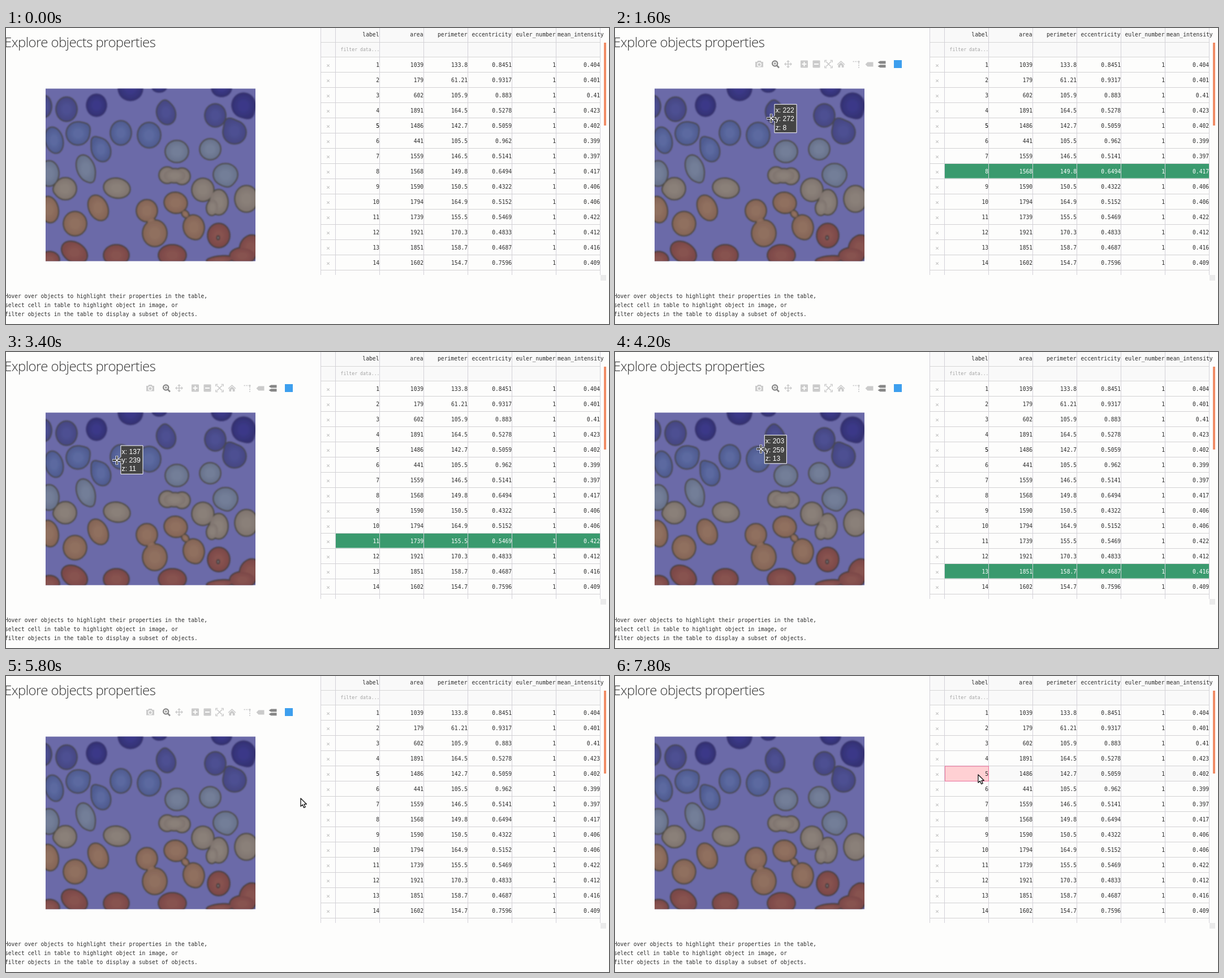
An HTML page that plays this animation: 1066 by 525 pixels, repeating every 8000 ms.

```html
<!DOCTYPE html>
<html lang="en">
<head>
<meta charset="utf-8">
<title>Object properties explorer</title>
<style>
  html, body { margin: 0; width: 100%; height: 100%; overflow: hidden; background: #fdfdfc; }
  svg { display: block; width: 1066px; height: 525px; }
  text { white-space: pre; }
  .title { font: 300 24px "Open Sans", "Noto Sans", sans-serif; letter-spacing: -.6px; fill: #333; }
  .mono { font-family: "DejaVu Sans Mono", monospace; font-size: 9.7px; fill: #2b2b2b; }
  .note { font-size: 9.6px; }
  .hint { font-size: 8.2px; fill: #a3a3a3; }
  .cross { fill: #b9b9b9; font-size: 11px; text-anchor: middle; }
  .end { text-anchor: end; }
  .hover text { fill: #fff; }
  .tip { font: 12.2px "Liberation Sans", Arial, sans-serif; fill: #fff; }
</style>
</head>
<body>
<svg id="stage" viewBox="0 0 1066 525" xmlns="http://www.w3.org/2000/svg"></svg>
<script>
const LOOP = 8000, STEP = 200;
const stage = document.getElementById('stage');

// ---- small markup helpers ----
const rect = (x, y, w, h, fill, more = '') =>
  `<rect x="${x}" y="${y}" width="${w}" height="${h}" fill="${fill}" ${more}/>`;
const text = (x, y, cls, s) => `<text x="${x}" y="${y}" class="${cls}">${s}</text>`;
const path = (d, fill, more = '') => `<path d="${d}" fill="${fill}" ${more}/>`;
const line = (d, color, width = 1) =>
  path(d, 'none', `stroke="${color}" stroke-width="${width}"`);

// ---- micrograph ----
// blob: cx, cy, rx, ry, rotation, direction of the tip, size of the tip
const groups = [
  { mid: '#3b3988', edge: '#343274', rim: '#37356f', blobs: [
    [220, 107, 23, 23], [271, 105, 14, 10], [381, 106, 19, 17],
    [420, 137, 22, 23, 0, 58, .22], [160, 137, 19, 21]] },
  { mid: '#4d5092', edge: '#454682', rim: '#464657', blobs: [
    [67, 139, 15, 21], [107, 144, 20, 23], [283, 151, 18, 22, -18, -92, .16],
    [370, 155, 20, 22], [404, 185, 22, 22, 0, -118, .35]] },
  { mid: '#5b69a0', edge: '#4f5b90', rim: '#4a4a52', blobs: [
    [203, 186, 20, 23], [127, 187, 22, 22, 15, -35, .18], [253, 190, 22, 24],
    [85, 199, 17, 25, -15], [168, 216, 18, 23, -20, -128, .25]] },
  { mid: '#737e98', edge: '#68728c', rim: '#4d4c4a', blobs: [
    [302, 219, 22, 21], [361, 215, 20, 20, 20], [141, 249, 17, 26, -20, 58, .12],
    [388, 260, 23, 21, 0, 75, .14], [76, 258, 19, 24]] },
  { mid: '#8a8079', edge: '#7f746f', rim: '#4e4b44', blobs: [
    [285, 261, 16, 16], [311, 263, 16, 16], [298, 262, 22, 14],
    [105, 285, 21, 21, 0, 175, .12], [196, 284, 25, 19, 10],
    [348, 287, 21, 22], [376, 309, 18, 24], [365, 318, 12, 16, 10],
    [425, 303, 22, 25]] },
  { mid: '#90705f', edge: '#856557', rim: '#4e4841', blobs: [
    [300, 310, 22, 20, 15], [317, 330, 7, 9, -40], [332, 353, 20, 23, -10, 65, .08],
    [163, 319, 18, 25, -25], [249, 324, 20, 21], [257, 344, 9, 10],
    [263, 364, 23, 25], [122, 347, 22, 23], [76, 322, 18, 25, -12]] },
  { mid: '#87524f', edge: '#7b4848', rim: '#4a403f', blobs: [
    [376, 368, 21, 23], [121, 398, 26, 19, 32], [195, 403, 24, 20],
    [294, 403, 26, 20], [432, 389, 20, 24, 25], [418, 404, 24, 16],
    [378, 411, 25, 8, -6], [77, 411, 19, 16]] }
];

function outline([cx, cy, rx, ry, turn = 0, tip = 0, size = 0]) {
  const rad = Math.PI / 180, c = Math.cos(turn * rad), s = Math.sin(turn * rad);
  const points = [];
  for (let i = 0; i < 48; i++) {
    const a = i * 7.5 * rad;
    let gap = a - (tip - turn) * rad;
    gap = Math.atan2(Math.sin(gap), Math.cos(gap));
    const k = 1 + size * Math.exp(-((gap / .42) ** 2));
    const x = (rx - 2.5) * k * Math.cos(a), y = (ry - 2.5) * k * Math.sin(a);
    points.push((cx + x * c - y * s).toFixed(1) + ' ' + (cy + x * s + y * c).toFixed(1));
  }
  return 'M' + points.join('L') + 'Z';
}

function micrograph() {
  let defs = '', rims = '', fills = '';
  groups.forEach((g, i) => {
    const d = g.blobs.map(outline);
    defs += `<radialGradient id="tone${i}"><stop offset=".35" stop-color="${g.mid}"/>` +
      `<stop offset="1" stop-color="${g.edge}"/></radialGradient>`;
    rims += d.map(p => path(p, g.rim, `stroke="${g.rim}" stroke-width="4.6"`)).join('');
    fills += d.map(p => path(p, `url(#tone${i})`)).join('');
  });
  return `<defs>${defs}<clipPath id="frame">${rect(70, 107.5, 371, 306, '#000')}</clipPath>
    <filter id="soft" x="0" y="0" width="1" height="1"><feGaussianBlur stdDeviation=".8"/></filter></defs>
    <g clip-path="url(#frame)">${rect(70, 107, 371, 307, '#6b6aa8')}
    <g filter="url(#soft)">${rims}${fills}
    <ellipse cx="375" cy="372" rx="3.5" ry="4.5" fill="#4b3f40"/>
    <ellipse cx="375" cy="372" rx="1.3" ry="2" fill="#7d7477"/></g></g>`;
}

// ---- table ----
const heads = ['label', 'area', 'perimeter', 'eccentricity', 'euler_number'];
const rows = `1039 133.8 0.8451 0.404
179 61.21 0.9317 0.401
602 105.9 0.883 0.41
1891 164.5 0.5278 0.423
1486 142.7 0.5059 0.402
441 105.5 0.962 0.399
1559 146.5 0.5141 0.397
1568 149.8 0.6494 0.417
1590 150.5 0.4322 0.406
1794 164.9 0.5152 0.406
1739 155.5 0.5469 0.422
1921 170.3 0.4833 0.412
1851 158.7 0.4687 0.416
1602 154.7 0.7596 0.409`.split('\n').map((row, i) => {
  const [area, rim, ecc, mean] = row.split(' ');
  return [i + 1, area, rim, ecc, 1, mean];
});
const colRight = i => 660.5 + 78 * i;
const rowTop = n => 51.5 + 27 * (n - 1);

function table() {
  let s = rect(556, 0, 495, 51, '#f9f9f9');
  s += rect(583, rowTop(5), 468, 27, '#f9f9f9', 'id="activeRow"');
  rows.forEach((r, i) => {
    const n = i + 1, y = rowTop(n);
    s += `<g id="row${n}">` + rect(583, y + .5, 468, 25.5, '#3a9a6e', 'class="band" visibility="hidden"') +
      r.map((v, c) => text(colRight(c) - .3, y + 17.7, 'mono end', v)).join('') + '</g>';
    s += text(569.5, y + 18, 'mono cross', '×');
  });
  for (let y = 25; y < 52; y += 26) s += line(`M556 ${y + .5}H1051`, '#d6d6d6');
  for (let n = 2; n < 16; n++) s += line(`M556 ${rowTop(n)}H1051`, '#d2d1d3');
  for (const x of [556.5, 582.5, 660.5, 738.5, 816.5, 894.5, 972.5, 1050.5])
    s += line(`M${x} 0V438`, '#d3d1d8');
  s += heads.map((h, c) => text(colRight(c) - 1, 15, 'mono end', h)).join('');
  s += text(975, 15, 'mono', 'mean_intensity') + text(591.5, 41, 'mono hint', 'filter data...');
  s += rect(583.5, 160, 77, 26.5, '#ffd0d3', 'stroke="#ea6f9c" id="activeCell"');
  s += text(colRight(0) - .3, rowTop(5) + 17.7, 'mono end', '5');
  return s + rect(1057, 26, 4, 147, '#f08c66') + rect(1051, 438, 10, 10, '#ebebeb');
}

// ---- toolbar ----
function toolbar() {
  const pale = '#cbcbcb', dark = '#868686';
  const at = (x, s) => `<g transform="translate(${x} 64)">${s}</g>`;
  const hole = '#fdfdfc';
  const tag = (y, h, c) => path(`M-7 ${y}l4 ${-h / 2}H7v${h}H-3Z`, c);
  return '<g id="toolbar" visibility="hidden">' +
    at(255, path('M-7-4h3l1.5-2h5l1.5 2h3v9.5H-7Z', pale) +
      `<circle cy=".7" r="3.2" fill="none" stroke="${hole}" stroke-width="1.4"/>`) +
    at(283, `<circle cx="-.3" cy="-1" r="4.6" fill="none" stroke="${dark}" stroke-width="2.2"/>` +
      line('M3 2.3L7 6.5', dark, 2.6) + line('M-2.6-1h4.6M-.3-3.3v4.6', dark, 1.2)) +
    at(306, line('M-5 0H5M0-5V5', pale, 1.6) +
      path('M-7 0l3-3v6ZM7 0l-3-3v6ZM0-7l-3 3h6ZM0 7l-3-3h6Z', pale)) +
    at(334.5, rect(-6.5, -6.5, 13, 13, pale, 'rx="1"') + line('M-4 0H4M0-4V4', hole, 2)) +
    at(356, rect(-6.5, -6.5, 13, 13, pale, 'rx="1"') + line('M-4 0H4', hole, 2)) +
    at(377.5, line('M-4.5-4.5L4.5 4.5M4.5-4.5L-4.5 4.5', pale, 1.6) +
      line('M-6.5-3v-3.5H-3M3-6.5h3.5V-3M6.5 3v3.5H3M-3 6.5h-3.5V3', pale, 1.6)) +
    at(399.5, path('M-7 .5L0-6L7 .5L6 1.5L0-4L-6 1.5ZM-5 1.7L0-2.8L5 1.7V6H1.3V2.2H-1.3V6H-5Z', pale)) +
    at(426.5, line('M-6-4.5H3M4.5-3V7', pale, 1.6).replace('/>', ' stroke-dasharray="2.4 1.6"/>') +
      '<circle cx="4.5" cy="-4.5" r="1.6" fill="' + pale + '"/>') +
    at(449.5, tag(.5, 8, pale)) +
    at(471.5, tag(-3, 5, dark) + tag(3.7, 5, dark)) +
    at(500, rect(-7, -7, 14, 14, '#3d9fee')) + '</g>';
}

// ---- pointer and tooltip ----
const plus = 'M-7.5 0H-1.5M1.5 0H7.5M0-7.5V-1.5M0 1.5V7.5';
const pointer =
  `<g id="plus">${line('M-8 0H8M0-8V8', '#fff', 4)}${line(plus, '#111', 1.8)}</g>
   <g id="arrow">${path('M0 0V14.2L3.3 11.2L5.6 16.6L8.2 15.5L5.9 10.3H10.3Z', '#fff',
    'stroke="#111" stroke-width="1.3" stroke-linejoin="round"')}</g>`;
const tooltip = `<g id="tooltip">${path('M0 0L5.5 5.5V25.2H44.6V-25.2H5.5V-5.5Z', '#444', 'stroke="#fff"')}
  ${['x', 'y', 'z'].map((k, i) => text(7.2, -10.4 + 15.3 * i, 'tip', '').replace('<text', `<text id="tip-${k}"`)).join('')}</g>`;

stage.innerHTML = rect(0, 0, 1066, 525, '#fdfdfc') +
  text(-3, 34, 'title', 'Explore objects properties') +
  ['Hover over objects to highlight their properties in the table,',
   'select cell in table to highlight object in image, or',
   'filter objects in the table to display a subset of objects.']
    .map((s, i) => text(-2, 479 + 16 * i, 'mono note', s)).join('') +
  micrograph() + table() + toolbar() + tooltip + pointer;

// ---- motion ----
// time, x, y of the pointer
const moves = [
  [400, 395, 80], [800, 310, 118], [1000, 282, 131], [1200, 275, 135], [1400, 281, 146],
  [1600, 276, 160], [2000, 258, 186], [2200, 254, 194], [2400, 246, 195], [2600, 226, 192],
  [3000, 206, 192], [3200, 196, 192], [3600, 196, 192], [3800, 205, 186], [4200, 258, 172],
  [4400, 275, 158], [4600, 279, 157], [4800, 279, 157], [5000, 296, 160], [5200, 352, 170],
  [5400, 405, 185], [5800, 521, 217], [6000, 548, 214], [6400, 612, 192], [6800, 642, 175]
];
// time, hovered object (0 for none), x, y in image units
const hovers = [
  [0, 0], [1400, 8, 225, 285], [1600, 8, 222, 272], [1800, 13, 209, 255], [2000, 13, 203, 244],
  [2200, 13, 197, 235], [3000, 11, 147, 239], [3200, 11, 137, 239], [3800, 11, 146, 244],
  [4000, 13, 178, 250], [4200, 13, 203, 259], [4400, 8, 220, 272], [4600, 8, 223, 274],
  [5000, 8, 243, 272], [5200, 9, 303, 262], [5400, 10, 360, 246], [5600, 0]
];
const SHOW_BAR = 400, HIDE_BAR = 6200, CLICK = 7000;

const $ = id => document.getElementById(id);
const show = (node, on) => node.setAttribute('visibility', on ? 'visible' : 'hidden');
const place = (id, x, y) => $(id).setAttribute('transform', `translate(${x} ${y})`);

function pointerAt(t) {
  const i = moves.findIndex(m => m[0] > t);
  if (i < 0) return moves[moves.length - 1].slice(1);
  if (i === 0) return null;
  const [t0, x0, y0] = moves[i - 1], [t1, x1, y1] = moves[i];
  const k = (t - t0) / (t1 - t0);
  return [x0 + (x1 - x0) * k, y0 + (y1 - y0) * k];
}

function draw(t) {
  const p = pointerAt(t);
  const inImage = p && p[0] > 70 && p[0] < 441 && p[1] > 107 && p[1] < 414;
  show($('plus'), inImage);
  show($('arrow'), p && !inImage);
  if (p) { place('plus', ...p); place('arrow', ...p); }

  show($('toolbar'), t >= SHOW_BAR && t < HIDE_BAR);
  show($('activeCell'), t >= CLICK);
  show($('activeRow'), t >= CLICK);

  const [, label, x, y] = hovers.filter(h => h[0] <= t).pop();
  show($('tooltip'), label);
  if (label) {
    place('tooltip', 70 + .93 * x, 413.5 - .93 * y);
    $('tip-x').textContent = 'x: ' + x;
    $('tip-y').textContent = 'y: ' + y;
    $('tip-z').textContent = 'z: ' + label;
  }
  rows.forEach(([n]) => {
    const g = $('row' + n);
    g.setAttribute('class', n === label ? 'hover' : '');
    show(g.querySelector('.band'), n === label);
  });
}

const start = performance.now();
let last = -1;
function tick() {
  const t = Math.floor((performance.now() - start) % LOOP / STEP) * STEP;
  if (t !== last) draw(last = t);
  requestAnimationFrame(tick);
}
tick();
</script>
</body>
</html>
```
